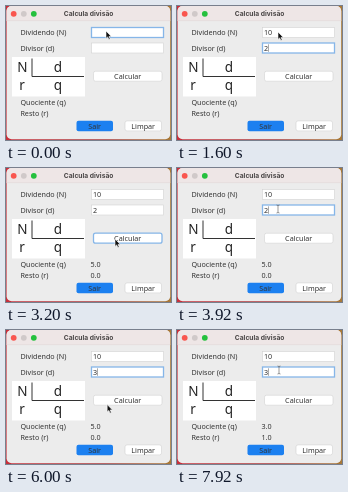
An HTML page for the animation above (8 s loop, 165 by 134 pixels).

```html
<!DOCTYPE html>
<html lang="pt">
<head>
<meta charset="utf-8">
<title>Calcula divisão</title>
<style>
  html, body { margin: 0; width: 100%; height: 100%; overflow: hidden; background: #b8323a; }
  svg { display: block; width: 100vw; height: 100vh; }
  text { font: 7.2px "Noto Sans", "Open Sans", sans-serif; fill: #333; }
  .title { font: 700 6.7px Inter, Roboto, sans-serif; fill: #4a4646; }
  .mid { text-anchor: middle; }
  .big { font-size: 13.5px; text-anchor: middle; fill: #222; }
  .field { fill: #fff; stroke: #d2d2d2; stroke-width: .6; }
  .button { fill: #fff; stroke: #d2d2d2; stroke-width: .6; }
  .focus { stroke: #86b6e8; stroke-width: 1.3; }
  .blue, .pressed { fill: #1c80f0; stroke: none; }
</style>
</head>
<body>
<svg viewBox="0 0 165 134" preserveAspectRatio="none">
  <defs>
    <linearGradient id="desk">
      <stop stop-color="#c8303c"/>
      <stop offset=".6" stop-color="#a8383a"/>
      <stop offset="1" stop-color="#a87a38"/>
    </linearGradient>
    <clipPath id="shape"><rect x=".6" width="163.6" height="133.2" rx="5"/></clipPath>
  </defs>
  <rect width="165" height="134" fill="url(#desk)"/>
  <g clip-path="url(#shape)">
    <rect width="165" height="134" fill="#ececec"/>
    <rect width="165" height="15" fill="#eee6e6"/>
    <rect y="14.6" width="165" height=".5" fill="#dbd4d4"/>
  </g>
  <circle cx="7.7" cy="7.8" r="2.9" fill="#f9564f"/>
  <circle cx="17.8" cy="7.8" r="2.9" fill="#d0c9c9"/>
  <circle cx="27.8" cy="7.8" r="2.9" fill="#25c13e"/>
  <text class="title mid" x="82.6" y="10.3">Calcula divisão</text>

  <text x="14.4" y="29.2">Dividendo (N)</text>
  <text x="14.4" y="44.7">Divisor (d)</text>
  <text x="14.4" y="99.2">Quociente (q)</text>
  <text x="14.4" y="109.7">Resto (r)</text>

  <rect x="6" y="51" width="73" height="39.5" fill="#fff"/>
  <path d="M26 52.5V70.5H78" fill="none" stroke="#333"/>
  <text class="big" x="16.4" y="66.3">N</text>
  <text class="big" x="52" y="66.3">d</text>
  <text class="big" x="16" y="84.3">r</text>
  <text class="big" x="52" y="84.3">q</text>

  <rect id="fieldN" class="field" x="85.5" y="21.5" width="72" height="10"/>
  <rect id="fieldD" class="field" x="85.5" y="37" width="72" height="10"/>
  <text id="dividend" x="87" y="29.2"></text>
  <text id="divisor" x="87" y="44.7"></text>
  <rect id="caret" width=".5" height="7.5" fill="#555"/>
  <text id="quotient" x="84.5" y="99.2"></text>
  <text id="rest" x="84.5" y="109.7"></text>

  <rect id="calc" class="button" x="87.5" y="65.2" width="68.5" height="10" rx="2"/>
  <text id="calcLabel" class="mid" x="121.7" y="72.8">Calcular</text>
  <rect class="button blue" x="70.5" y="114.7" width="36.5" height="10.5" rx="2"/>
  <text class="mid" x="88.7" y="122.6">Sair</text>
  <rect class="button" x="119" y="114.9" width="36.5" height="10" rx="2"/>
  <text class="mid" x="137.2" y="122.6">Limpar</text>

  <g id="pointer">
    <path id="arrow" d="M0 0V7.4L1.7 5.9L2.9 8.6L4.2 8L3 5.4H5.3Z" fill="#111" stroke="#fff" stroke-width=".6"/>
    <path id="beam" d="M-1.5-4Q0-4 0-3Q0-4 1.5-4M0-3V3M-1.5 4Q0 4 0 3Q0 4 1.5 4" fill="none" stroke="#555" stroke-width=".6"/>
  </g>
</svg>
<script>
  const LOOP = 8000, STEP = 80;
  const el = id => document.getElementById(id);

  // Each list holds [start time, value]; values switch hard.
  const track = {
    dividend: [[0, ""], [480, "1"], [640, "10"]],
    divisor: [[0, ""], [1280, "2"], [4480, ""], [4880, "3"]],
    quotient: [[0, ""], [2640, "5.0"], [6480, "3.0"]],
    rest: [[0, ""], [2640, "0.0"], [6480, "1.0"]],
    focus: [[0, "fieldN"], [960, "fieldD"], [2480, "calc"], [3760, "fieldD"], [6320, "calc"], [7760, "fieldD"]],
    pressed: [[0, false], [2480, true], [2640, false], [6320, true], [6480, false]],
    beam: [[0, false], [3680, true], [5360, false], [7600, true]]
  };

  // Pointer stops: [time, x, y]
  const path = [
    [0, 100, 25], [320, 101, 26], [1840, 101, 26], [2400, 109, 71],
    [3200, 109, 71], [3680, 101, 41], [5200, 101, 41], [5920, 101, 75],
    [6240, 102, 72], [7120, 102, 72], [7680, 102, 40], [LOOP, 102, 40]
  ];

  const entryAt = (list, t) => list.filter(([start]) => start <= t).pop();
  const at = (list, t) => entryAt(list, t)[1];
  const ease = p => p * p * (3 - 2 * p);

  function pointerAt(t) {
    const i = path.findIndex(stop => stop[0] > t);
    const [t0, x0, y0] = path[i - 1], [t1, x1, y1] = path[i];
    const p = ease((t - t0) / (t1 - t0));
    return [x0 + (x1 - x0) * p, y0 + (y1 - y0) * p];
  }

  function drawCaret(t) {
    const [start, focus] = entryAt(track.focus, t);
    const text = el(focus === "fieldN" ? "dividend" : "divisor");
    const on = focus !== "calc" && t >= 160 && (t - start) % 1000 < 680;
    el("caret").setAttribute("visibility", on ? "visible" : "hidden");
    el("caret").setAttribute("x", 87.2 + text.textContent.length * 4.12);
    el("caret").setAttribute("y", focus === "fieldN" ? 22.8 : 38.3);
  }

  function draw(now) {
    const t = Math.floor(now % LOOP / STEP) * STEP;
    for (const id of ["dividend", "divisor", "quotient", "rest"])
      el(id).textContent = at(track[id], t);

    const focus = at(track.focus, t), pressed = at(track.pressed, t);
    for (const id of ["fieldN", "fieldD", "calc"])
      el(id).classList.toggle("focus", id === focus && !pressed);
    el("calc").classList.toggle("pressed", pressed);
    drawCaret(t);

    const beam = at(track.beam, t);
    el("arrow").setAttribute("visibility", beam ? "hidden" : "visible");
    el("beam").setAttribute("visibility", beam ? "visible" : "hidden");
    el("pointer").setAttribute("transform", `translate(${pointerAt(t)})`);
  }

  const begin = performance.now();
  function tick() {
    draw(performance.now() - begin);
    requestAnimationFrame(tick);
  }
  tick();
</script>
</body>
</html>
```
